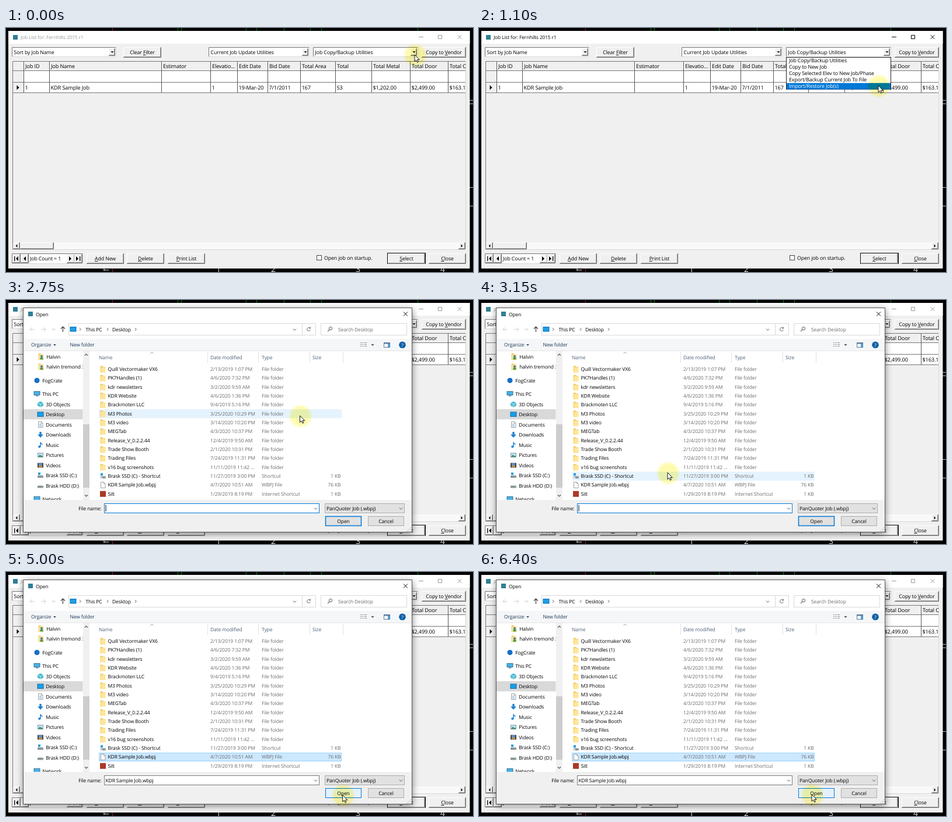
An HTML page that plays this animation: 800x420 px, repeating every 6500 ms.

```html
<!DOCTYPE html>
<html lang="en">
<head>
<meta charset="utf-8">
<title>Restoring a job</title>
<style>
html, body { margin: 0; width: 100%; height: 100%; overflow: hidden; background: #000; }
svg { display: block; width: 800px; height: 420px; }
text { font-family: "Open Sans", "Noto Sans", sans-serif; font-size: 8.5px; letter-spacing: -.13px; text-rendering: geometricPrecision; white-space: pre; }
.form text { font-size: 8.8px; }
.form .cell { font-size: 9.2px; }
.form .caption { font-size: 8.4px; }
#halo { mix-blend-mode: multiply; }
</style>
</head>
<body>
<svg id="stage" viewBox="0 0 800 420"></svg>
<script>
const LOOP = 6500, STEP = 50;
const OPEN_LIST = 400, CLOSE_LIST = 1450, SHOW_DIALOG = 1900, FILL_DIALOG = 2150, PICK = 4050;
const GREY = '#6d6d6d', BLUE = '#0078d7', FACE = '#f0f0f0';

// Drawing helpers, all returning markup
const rect = (x, y, w, h, fill, more = '') => `<rect x="${x}" y="${y}" width="${w}" height="${h}" fill="${fill}" ${more}/>`;
const frame = (x, y, w, h, fill, stroke, more = '') => rect(x + .5, y + .5, w - 1, h - 1, fill, `stroke="${stroke}" ${more}`);
const text = (x, y, s, fill = '#000', more = '') => `<text x="${x}" y="${y}" fill="${fill}" ${more}>${s}</text>`;
const mid = (x, y, s, fill) => text(x, y, s, fill, 'text-anchor="middle"');
const fillPath = (d, fill = '#000') => `<path d="${d}" fill="${fill}"/>`;
const line = (d, stroke = '#000', w = 1) => `<path d="${d}" fill="none" stroke="${stroke}" stroke-width="${w}"/>`;
const group = (id, body, more = '') => `<g id="${id}" ${more}>${body}</g>`;
const clip = (id, x, y, w, h) => `<clipPath id="${id}">${rect(x, y, w, h, '#000')}</clipPath>`;
const down = (x, y, r, fill) => fillPath(`M${x - r} ${y - r / 2}h${2 * r}l${-r} ${r}z`, fill);
const side = (x, y, dir, r = 4) => fillPath(`M${x - dir * r / 2} ${y - r}v${2 * r}l${dir * r} ${-r}z`);
const chevron = (x, y, stroke = '#444') => line(`M${x - 2.5} ${y - 1.3}l2.5 2.6 2.5 -2.6`, stroke, .9);
const crumb = (x, y) => line(`M${x - 1} ${y - 2.3}l2.2 2.3 -2.2 2.3`, '#444', .9);
const cross = (x, y, r) => `M${x - r} ${y - r}l${2 * r} ${2 * r}m0 ${-2 * r}l${-2 * r} ${2 * r}`;

const raised = (x, y, w, h) => rect(x, y, w, h, FACE)
  + line(`M${x + .5} ${y + h}V${y + .5}H${x + w}`, '#fff')
  + line(`M${x + 1} ${y + h - 1.5}H${x + w - 1.5}V${y + 1}`, '#a0a0a0')
  + line(`M${x} ${y + h - .5}H${x + w - .5}V${y}`, '#696969');
const sunken = (x, y, w, h, fill) => rect(x, y, w, h, fill)
  + line(`M${x + .5} ${y + h}V${y + .5}H${x + w}`, '#777')
  + line(`M${x} ${y + h - .5}H${x + w - .5}V${y}`, '#d8d8d8');
const button = (x, y, w, label) => raised(x, y, w, 18) + mid(x + w / 2, y + 12, label);
const combo = (x, w, label) => sunken(x, 33, w, 17, '#fff') + text(x + 3.5, 44.6, label)
  + raised(x + w - 13, 35, 11, 13) + down(x + w - 7, 41.5, 2.7);
const key = c => `<tspan text-decoration="underline">${c}</tspan>`;

function backdrop() {
  let s = rect(0, 0, 800, 420, '#000');
  for (const x of [294, 300, 411, 429, 476, 521, 540, 705]) s += line(`M${x + .5} 0V6`, '#0a7d14');
  s += line('M182.5 0V6M182.5 414V420', '#a01818');
  s += line('M794 124.5H800M794 130.5H800M794 274.5H800M794 306.5H800', '#bbb');
  [[364, 1], [458, 2], [603, 3], [748, 4]].forEach(([x, n]) => {
    s += text(x, 420, n, '#ddd', 'text-anchor="middle" style="font-size:14px"');
  });
  return s + line('M167 416.5H176M168 414V418', '#ddd');
}

function grid() {
  const edges = [11, 31, 75, 267, 351, 397, 449, 505, 565, 627, 693, 758];
  const heads = ['', 'Job ID', 'Job Name', 'Estimator', 'Elevatio...', 'Edit Date', 'Bid Date', 'Total Area', 'Total', 'Total Metal', 'Total Door', 'Total Cost'];
  const cells = ['', '1', 'KDR Sample Job', '', '1', '19-Mar-20', '7/1/2011', '167', '53', '$1,202.00', '$2,499.00', '$163.19'];
  let s = sunken(11, 57, 777, 325, FACE) + rect(31, 74, 756, 37, '#fff');
  s += line('M12 73.5H787M12 93.5H787M12 111.5H787', '#777');
  edges.forEach((x, i) => {
    if (i) s += line(`M${x - .5} 58V111`, '#555') + line(`M${x + .5} 58V73`, '#fff');
    s += text(x + 2, 69, heads[i], '#000', 'class="cell"') + text(x + 1.5, 106, cells[i], '#000', 'class="cell"');
  });
  s = `<g clip-path="url(#gridClip)">${s}</g>` + side(20.5, 102.5, 1);
  s += rect(12, 369, 775, 12, '#f9f9f9') + raised(12, 369, 12, 12) + raised(24, 369, 58, 12) + raised(775, 369, 12, 12);
  return s + side(18, 375, -1, 2.7) + side(781, 375, 1, 2.7);
}

function form() {
  let s = rect(4, 5, 790.5, 409, FACE) + rect(4, 5, 790.5, 22, '#fff') + rect(12, 12, 8, 8, '#2f7f95');
  s += group('caption', text(25, 19, 'Job List for: Fernhilts 2015 r1', 'currentColor', 'class="caption"')
    + line('M707 15.5h8M740.5 12.5h6v6h-6z', 'currentColor') + line(cross(777, 15.5, 3.3), 'currentColor'));
  s += combo(10, 179, 'Sort by Job Name') + combo(347, 173, 'Current Job Update Utilities') + combo(526, 180, 'Job Copy/Backup Utilities');
  s += button(201, 33, 65, `Clear ${key('F')}ilter`) + button(712, 33, 76, `Copy to ${key('V')}endor`);
  s += grid();
  s += sunken(10, 388, 122, 18, '#fff');
  [11, 25, 104, 117].forEach(x => s += raised(x, 389, 14, 16));
  s += side(19, 397, -1) + rect(14, 393, 1.3, 8, '#000') + side(32, 397, -1)
    + side(110, 397, 1) + side(122, 397, 1) + rect(126, 393, 1.3, 8, '#000') + text(41, 400, 'Job Count = 1');
  s += button(138, 388, 64, `${key('A')}dd New`) + button(207, 388, 64, `${key('D')}elete`) + button(277, 388, 64, `${key('P')}rint List`);
  s += frame(532, 391, 9, 9, '#fff', '#444') + text(545, 399, 'Open job on startup.');
  s += rect(653, 387, 66, 19, '#000') + button(654, 388, 64, `${key('S')}elect`) + button(724, 388, 64, `${key('C')}lose`);
  return s;
}

const choices = ['Job Copy/Backup Utilities', 'Copy to New Job', 'Copy Selected Elev to New Job/Phase', 'Export/Backup Current Job To File', 'Import/Restore Job(s)'];
const dropList = () => frame(526, 50, 180, 56, '#fff', '#222') + rect(527, 0, 178, 11, BLUE, 'id="choiceBar"')
  + choices.map((c, i) => text(531, 59.2 + 11 * i, c, '#000', 'class="choice"')).join('');

// Icons, centred on x, y
const icon = {
  folder: (x, y) => fillPath(`M${x - 4.5} ${y - 5.5}h4l1 1.5h3.5v9.5h-8.5z`, '#f0cd6c') + rect(x - 3.5, y - 3.2, 8, 8.7, '#ffe597'),
  sheet: (x, y) => `<path d="M${x - 3.5} ${y - 5}h5l2.5 2.5v7.5h-7.5z" fill="#fff" stroke="#8a8a8a" stroke-width=".8"/>` + line(`M${x + 1.3} ${y - 5}v2.6h2.6`, '#8a8a8a', .7),
  user: (x, y) => icon.folder(x, y) + `<circle cx="${x + 1}" cy="${y - .5}" r="2" fill="#3a78a8"/>` + rect(x - 1.5, y + 1.5, 5, 3.5, '#4d9a4d'),
  drive: (x, y) => rect(x - 5, y, 10, 4, '#8b9197', 'rx="1"') + rect(x + 2, y + 1.5, 1.6, 1, '#7dff7d'),
  system: (x, y) => icon.drive(x, y) + rect(x - 4, y - 5, 4, 4, '#1f9be0'),
  cloud: (x, y) => `<circle cx="${x}" cy="${y}" r="4.5" fill="#1470c8"/>`,
  pc: (x, y) => frame(x - 5.5, y - 4.5, 11, 7, '#45b4ec', '#34718f') + rect(x - 2.5, y + 3, 5, 1.2, '#34718f'),
  desk: (x, y) => frame(x - 5.5, y - 4.5, 11, 8.5, '#1c9ee8', '#0b6cae'),
  cube: (x, y) => fillPath(`M${x} ${y - 5}l5 2.5v5l-5 2.5-5-2.5v-5z`, '#48b9d0') + line(`M${x - 5} ${y - 2.5}l5 2.5 5-2.5M${x} ${y}v5`, '#d9f4f8', .9),
  text: (x, y) => icon.sheet(x, y) + line(`M${x - 2} ${y - 1}h4M${x - 2} ${y + 1}h4M${x - 2} ${y + 3}h4`, '#4b8ec4', .7),
  get: (x, y) => fillPath(`M${x - 1.7} ${y - 5}h3.4v4.5h3.3l-5 5.5-5-5.5h3.3z`, '#1e82d2'),
  note: (x, y) => line(`M${x} ${y + 3}v-7.5q1 2.5 3.5 3.5`, '#1e82d2', 1.4) + `<circle cx="${x - 1.7}" cy="${y + 3}" r="2.1" fill="#1e82d2"/>`,
  photo: (x, y) => frame(x - 5, y - 4, 10, 8, '#bfe4fa', '#8a9aa6') + fillPath(`M${x - 4} ${y + 3}l3-4 2.5 2.5 1-1 1.5 2.5z`, '#3d8d6d'),
  film: (x, y) => rect(x - 5, y - 4, 10, 8, '#444') + rect(x - 3, y - 3.4, 6, 6.8, '#5a8fd0') + rect(x - 3, y, 6, 3.4, '#b88a50'),
  red: (x, y) => rect(x - 5, y - 5, 10, 10, '#ad3827'),
  link: (x, y) => icon.system(x, y) + rect(x - 5, y + 1, 4, 4, '#fff') + line(`M${x - 4} ${y + 4}l2.5-2.5`, '#0b6cae')
};

const places = [
  [97.5, 'Halvin', 'user', 60], [115, 'halvin tremond 35', 'user', 60], [138.5, 'FogCrate', 'cloud', 53], [161.5, 'This PC', 'pc', 53],
  [179.5, '3D Objects', 'cube', 59], [197, 'Desktop', 'desk', 59], [214.5, 'Documents', 'text', 59], [232, 'Downloads', 'get', 59],
  [249.5, 'Music', 'note', 59], [267, 'Pictures', 'photo', 59], [284.5, 'Videos', 'film', 59], [302, 'Brask SSD (C:)', 'system', 59],
  [319.5, 'Brask HDD (D:)', 'drive', 59], [342.5, 'Network', 'pc', 53]];
const files = [
  ['Quill Vectormaker VX6', '2/13/2019 1:07 PM'], ['PK7Handles (1)', '4/6/2020 7:32 PM'], ['kdr newsletters', '3/2/2020 9:59 AM'],
  ['KDR Website', '4/6/2020 1:36 PM'], ['Brackmoten LLC', '9/4/2019 5:16 PM'], ['M3 Photos', '3/25/2020 10:29 PM'],
  ['M3 video', '3/14/2020 10:20 PM'], ['MEGTab', '4/3/2020 10:37 PM'], ['Release_V_0.2.2.44', '12/4/2019 9:50 AM'],
  ['Trade Show Booth', '2/1/2020 10:31 PM'], ['Trading Files', '7/24/2019 11:31 PM'], ['v16 bug screenshots', '11/11/2019 11:42 ...'],
  ['Brask SSD (C) - Shortcut', '11/27/2019 3:00 PM', 'Shortcut', '1 KB', 'link'],
  ['KDR Sample Job.wbpj', '4/7/2020 10:51 AM', 'WBPJ File', '76 KB', 'sheet'],
  ['Silt', '1/29/2019 8:19 PM', 'Internet Shortcut', '1 KB', 'red']];
const ROW = 15.34, TOP = 111.4, CHOSEN = 13;

function sidebar() {
  let s = rect(30, 188, 102, 17.5, '#d9d9d9'), early = '', late = '';
  for (const [y, label, kind, x] of places) {
    s += text(x + 9.2, y + 3, label);
    if (['user', 'system', 'drive'].includes(kind)) {
      early += icon.sheet(x, y);
      late += icon[kind](x, y);
    } else s += icon[kind](x, y);
  }
  s += group('roughIcons', early) + group('fineIcons', late);
  return `<g clip-path="url(#sideClip)">${s}</g>` + rect(132, 88, 11, 256, FACE) + rect(132, 214, 11, 109, '#cdcdcd')
    + line('M135 95.5l2.5-2.5 2.5 2.5M135 335.5l2.5 2.5 2.5-2.5', '#555', 1.2);
}

function fileList() {
  let s = line('M345.5 89V108M432.5 89V108M520.5 89V108M577.5 89V108', '#e2e2e2') + line('M247.5 92l2.5-2.3 2.5 2.3', '#777', .8);
  [[159, 'Name'], [350, 'Date modified'], [438, 'Type'], [525, 'Size']].forEach(([x, h]) => s += text(x, 101.5, h, '#4c607a'));
  s += rect(159, 0, 416, ROW, '#e5f3ff', 'id="rowHover"');
  s += frame(159, Math.round(TOP + CHOSEN * ROW), 416, 15, '#cce8ff', '#99d1ff', 'id="rowPick"');
  files.forEach(([name, date, type = 'File folder', size = '', kind = 'folder'], i) => {
    const y = TOP + (i + .5) * ROW;
    s += icon[kind](166, y) + text(174.5, y + 3, name) + text(350, y + 3, date, GREY) + text(438, y + 3, type, GREY)
      + text(573.5, y + 3, size, GREY, 'text-anchor="end"');
  });
  return s;
}

function controls() {
  let s = line('M49 50.5h-8m3.5-3.5l-3.5 3.5 3.5 3.5M60 50.5h8m-3.5-3.5l3.5 3.5-3.5 3.5', '#d0d0d0') + chevron(81.5, 50.5, '#aaa')
    + line('M97.5 55v-9m-3.5 3.5l3.5-3.5 3.5 3.5', '#333', 1.1);
  s += frame(107, 40, 424, 21, '#fff', '#d9d9d9') + line('M507.5 40V61', '#d9d9d9') + icon.desk(115, 50.5);
  s += crumb(127, 50.5) + text(136.5, 53.5, 'This PC') + crumb(174, 50.5) + text(182, 53.5, 'Desktop') + crumb(222, 50.5) + chevron(494.5, 51);
  s += line('M521 48.6a3 3 0 1 0 .4 2.8M521.6 46.4v2.4h-2.4', '#555', .9);
  s += frame(539, 40, 148, 21, '#fff', '#d9d9d9') + '<circle cx="556" cy="49" r="2.7" fill="none" stroke="#666"/>'
    + line('M554 51l-3 3.2', '#666', 1.1) + text(569, 53.5, 'Search Desktop', GREY);
  s += text(43, 80, 'Organize', '#1e395b') + down(83.5, 77.5, 2.5, '#1e395b') + text(109.5, 80, 'New folder', '#1e395b');
  for (let y = 73; y < 82; y += 3) s += line(`M607 ${y + .5}h2m1 0h2.5m1.5 0h4`, '#8a8f98', 1.2);
  s += down(628, 77.5, 2.6, '#333');
  s += text(163.5, 361.5, 'File name:', '#000', 'text-anchor="end"') + frame(168, 350, 369, 17, '#fff', '#7a7a7a', 'id="field"') + chevron(530.5, 359);
  s += text(170.5, 362, 'KDR Sample Job.wbpj', '#000', 'id="fileName"') + rect(170.5, 353, 1, 11, '#000', 'id="caret"');
  s += frame(546, 350, 137, 17, '#e1e1e1', '#adadad') + text(549, 362, 'PanQuoter Job (.wbpj)') + chevron(676.5, 359);
  s += rect(547.5, 372.5, 61, 16, '#e1e1e1', 'id="openButton"') + mid(578, 383.5, 'Open') + frame(620, 372, 62, 17, '#e1e1e1', '#adadad') + mid(651, 383.5, 'Cancel');
  for (const [x, y] of [[693, 391], [693, 394], [690, 394], [693, 397], [690, 397], [687, 397]]) s += rect(x, y, 1.3, 1.3, '#b5b5b5');
  return s;
}

function dialog() {
  let s = rect(30, 13, 666, 386, '#fff', 'filter="url(#shade)"') + frame(29, 13, 667, 387, '#fff', '#555');
  s += rect(38, 20, 8, 8, '#2f7f95') + text(51, 27.5, 'Open') + line(cross(684.5, 24, 3.5));
  s += rect(30, 67, 665, 20, '#f5f6f7') + line('M30 87.5H695', '#e6e6e6');
  s += frame(647, 73, 11, 9, '#fff', '#5b7da0') + rect(654, 74, 3, 7, '#4aa3df') + rect(648, 74, 9, 1.5, '#5b7da0');
  s += '<circle cx="679" cy="77.3" r="5.8" fill="#0a5fa8"/>' + mid(679, 80.5, '?', '#fff');
  s += sidebar() + fileList() + rect(30, 344, 665, 55, FACE);
  const blanks = [[125, 353, 39, 11], [168, 350, 369, 17], [546, 350, 137, 17], [546, 372, 64, 17], [619, 372, 64, 17], [683, 387, 12, 12]];
  return s + group('blanks', blanks.map(b => rect(...b, '#fff')).join('')) + group('controls', controls());
}

const stage = document.getElementById('stage');
stage.innerHTML = `<defs>${clip('gridClip', 11, 57, 777, 325)}${clip('sideClip', 30, 88, 101.5, 256)}
  <filter id="shade" x="-10%" y="-10%" width="120%" height="120%"><feDropShadow dx="0" dy="3" stdDeviation="6" flood-opacity=".5"/></filter>
  <radialGradient id="glow"><stop offset=".72" stop-color="#fffbae"/><stop offset="1" stop-color="#fffbae" stop-opacity="0"/></radialGradient></defs>`
  + backdrop() + group('form', form() + group('dropList', dropList()), 'class="form"') + group('dialog', dialog())
  + '<circle id="halo" r="21" fill="url(#glow)"/>'
  + '<path id="pointer" d="M0 0V11.6L2.7 9.2 4.5 13.2 6.3 12.4 4.6 8.5H8.2Z" fill="#fff" stroke="#000" stroke-width=".9"/>';

const el = {};
stage.querySelectorAll('[id]').forEach(e => el[e.id] = e);
const choiceText = [...stage.querySelectorAll('.choice')];
const show = (e, on) => e.setAttribute('visibility', on ? 'inherit' : 'hidden');

// Pointer stops: time, x, y
const path = [[0, 700, 46], [500, 702, 48], [750, 703, 49], [1050, 684, 99], [2400, 684, 101], [3100, 323, 297], [3500, 324, 298],
  [3900, 281, 319], [4350, 281, 320], [4850, 552, 378], [5100, 590, 387], [5400, 545, 376], [5700, 590, 372], [6000, 602, 386], [6400, 570, 383], [6500, 570, 383]];

function pointerAt(t) {
  const i = path.findIndex(p => p[0] > t);
  const [t0, x0, y0] = path[i - 1], [t1, x1, y1] = path[i];
  const u = (t - t0) / (t1 - t0), k = u * u * (3 - 2 * u);
  return [x0 + (x1 - x0) * k, y0 + (y1 - y0) * k];
}

function draw(t) {
  const [x, y] = pointerAt(t);
  const ready = t >= FILL_DIALOG, picked = t >= PICK;
  const active = t >= OPEN_LIST && t < SHOW_DIALOG;
  el.pointer.setAttribute('transform', `translate(${x} ${y})`);
  el.halo.setAttribute('transform', `translate(${x + 1} ${y + 1})`);
  el.caption.setAttribute('color', active ? '#000' : '#999');

  show(el.dropList, t >= OPEN_LIST && t < CLOSE_LIST);
  const hot = Math.max(0, Math.min(4, Math.floor((y - 50.5) / 11)));
  el.choiceBar.setAttribute('y', 50.7 + 11 * hot);
  choiceText.forEach((c, i) => c.setAttribute('fill', i === hot ? '#fff' : '#000'));

  show(el.dialog, t >= SHOW_DIALOG);
  for (const e of [el.blanks, el.roughIcons]) show(e, !ready);
  for (const e of [el.controls, el.fineIcons]) show(e, ready);

  const row = Math.floor((y - TOP) / ROW);
  show(el.rowHover, ready && x > 159 && x < 575 && row >= 0 && row < files.length);
  el.rowHover.setAttribute('y', TOP + row * ROW);
  show(el.rowPick, picked);
  show(el.fileName, picked);
  show(el.caret, ready && !picked && (t - FILL_DIALOG) % 1060 >= 530);
  el.field.setAttribute('stroke', t < 4400 ? BLUE : '#7a7a7a');

  const over = x > 547 && x < 609 && y > 372 && y < 389;
  el.openButton.setAttribute('fill', over ? '#e5f1fb' : '#e1e1e1');
  el.openButton.setAttribute('stroke', BLUE);
  el.openButton.setAttribute('stroke-width', over ? 1 : 1.5);
}

const start = performance.now();
function tick() {
  const t = (performance.now() - start) % LOOP;
  draw(Math.min(6400, Math.floor(t / STEP) * STEP));
  requestAnimationFrame(tick);
}
tick();
</script>
</body>
</html>
```
